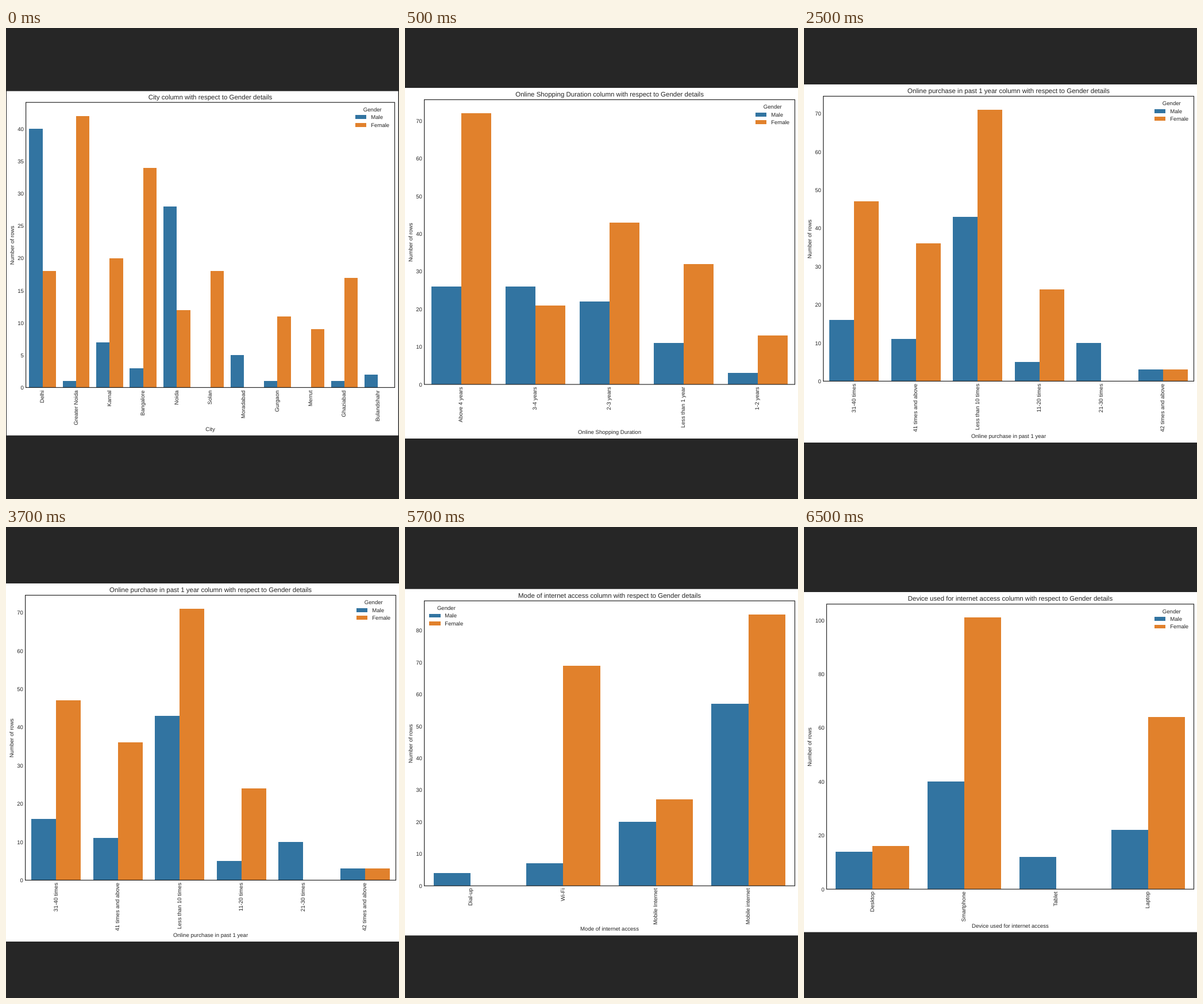
An HTML page for the animation above (8000 ms loop, 684x818 px).

```html
<!DOCTYPE html>
<html lang="en">
<head>
<meta charset="utf-8">
<title>Gender bar charts</title>
<style>
  html, body { margin: 0; width: 100%; height: 100%; overflow: hidden; background: #262626; }
  svg { display: block; width: 684px; height: 818px; }
  text {
    font: 9.61px "Liberation Sans", Arial, sans-serif;
    fill: #262626;
    text-rendering: geometricPrecision;
  }
  .title { font-size: 11.53px; }
  .mid { text-anchor: middle; }
  .end { text-anchor: end; }
  .bar { shape-rendering: crispEdges; }
  .male { fill: #3274a1; }
  .female { fill: #e1812c; }
  .panel { fill: #fff; }
  .axes { fill: none; stroke: #262626; stroke-width: 1.2; }

  .chart { visibility: hidden; animation: 8s step-end infinite; }
  #city { animation-name: city; }
  #duration { animation-name: duration; }
  #purchase { animation-name: purchase; }
  #mode { animation-name: mode; }
  #device { animation-name: device; }
  @keyframes city { 0% { visibility: visible } 6.25%, 100% { visibility: hidden } }
  @keyframes duration { 0% { visibility: hidden } 6.25% { visibility: visible } 31.25%, 100% { visibility: hidden } }
  @keyframes purchase { 0% { visibility: hidden } 31.25% { visibility: visible } 56.25%, 100% { visibility: hidden } }
  @keyframes mode { 0% { visibility: hidden } 56.25% { visibility: visible } 81.25%, 100% { visibility: hidden } }
  @keyframes device { 0% { visibility: hidden } 81.25%, 100% { visibility: visible } }
</style>
</head>
<body>
<svg id="stage" viewBox="0 0 684 818"></svg>
<script>
// panel and axes: [left, top, right, bottom]; rows: [label, male, female]
const charts = [
  { id: "city", name: "City", panel: [1, 109.6, 682.6, 707.6], axes: [34.6, 129.2, 676.5, 624.4],
    step: 5, tickGap: 5, xLabelY: 700.2, yLabelX: 14.1,
    rows: [["Delhi", 40, 18], ["Greater Noida", 1, 42], ["Karnal", 7, 20], ["Bangalore", 3, 34],
      ["Noida", 28, 12], ["Solan", 0, 18], ["Moradabad", 5, 0], ["Gurgaon", 1, 11],
      ["Merrut", 0, 9], ["Ghaziabad", 1, 17], ["Bulandshahr", 2, 0]] },
  { id: "duration", name: "Online Shopping Duration", panel: [0, 104, 684, 713], axes: [33.6, 124.5, 678.5, 619],
    step: 10, tickGap: 4.4, xLabelY: 705.2, yLabelX: 13.2,
    rows: [["Above 4 years", 26, 72], ["3-4 years", 26, 21], ["2-3 years", 22, 43],
      ["Less than 1 year", 11, 32], ["1-2 years", 3, 13]] },
  { id: "purchase", name: "Online purchase in past 1 year", panel: [0, 98, 684, 720], axes: [33.6, 118.5, 678.5, 613.4],
    step: 10, tickGap: 4.4, xLabelY: 711.8, yLabelX: 13.2,
    rows: [["31-40 times", 16, 47], ["41 times and above", 11, 36], ["Less than 10 times", 43, 71],
      ["11-20 times", 5, 24], ["21-30 times", 10, 0], ["42 times and above", 3, 3]] },
  { id: "mode", name: "Mode of internet access", panel: [0, 107.7, 684, 709.4], axes: [33.6, 128.3, 678.5, 623.2],
    step: 10, tickGap: 4.2, xLabelY: 701.4, yLabelX: 13.2, legendLeft: true,
    rows: [["Dial-up", 4, 0], ["Wi-Fi", 7, 69], ["Mobile Internet", 20, 27], ["Mobile internet", 57, 85]] },
  { id: "device", name: "Device used for internet access", panel: [0, 113, 684, 703.6], axes: [39.4, 133.9, 678.5, 629],
    step: 20, tickGap: 4.2, xLabelY: 695.5, yLabelX: 13.2,
    rows: [["Desktop", 14, 16], ["Smartphone", 40, 101], ["Tablet", 12, 0], ["Laptop", 22, 64]] }
];

const rect = (cls, x, y, w, h) =>
  `<rect class="${cls}" x="${x}" y="${y}" width="${w}" height="${h}"/>`;
const box = (cls, [l, t, r, b]) => rect(cls, l, t, r - l, b - t);
const text = (cls, x, y, s) => `<text class="${cls}" x="${x}" y="${y}">${s}</text>`;
const upright = (cls, x, y, s) =>
  `<text class="${cls}" transform="translate(${x} ${y}) rotate(-90)">${s}</text>`;

function legend(x, top) {
  const entry = (cls, label, y) =>
    rect("bar " + cls, x, y - 3.4, 19.2, 6.8) + text("", x + 27, y + 3.4, label);
  return text("mid", x + 29.6, top + 15.6, "Gender") +
    entry("male", "Male", top + 25.6) + entry("female", "Female", top + 39.1);
}

function draw(c) {
  const [l, t, r, b] = c.axes;
  const slot = (r - l) / c.rows.length;
  const limit = 1.05 * Math.max(...c.rows.flatMap(row => row.slice(1)));
  const unit = (b - t) / limit;
  const bar = (cls, x, v) => v ? rect("bar " + cls, x, b - v * unit, slot * 0.4, v * unit) : "";

  let out = box("panel", c.panel);
  c.rows.forEach(([label, male, female], i) => {
    const mid = l + (i + 0.5) * slot;
    out += bar("male", mid - slot * 0.4, male) + bar("female", mid, female);
    out += upright("end", mid + 2.4, b + c.tickGap, label);
  });
  for (let v = 0; v < limit; v += c.step) out += text("end", l - 3.7, b - v * unit + 3.6, v);

  out += box("axes", c.axes);
  out += text("title mid", (l + r) / 2, t - 5.5, c.name + " column with respect to Gender details");
  out += text("mid", (l + r) / 2, c.xLabelY, c.name);
  out += upright("mid", c.yLabelX, (t + b) / 2 + 0.5, "Number of rows");
  out += legend(c.legendLeft ? l + 8.7 : r - 68.3, t);
  return `<g class="chart" id="${c.id}">${out}</g>`;
}

document.getElementById("stage").innerHTML = charts.map(draw).join("");
</script>
</body>
</html>
```
